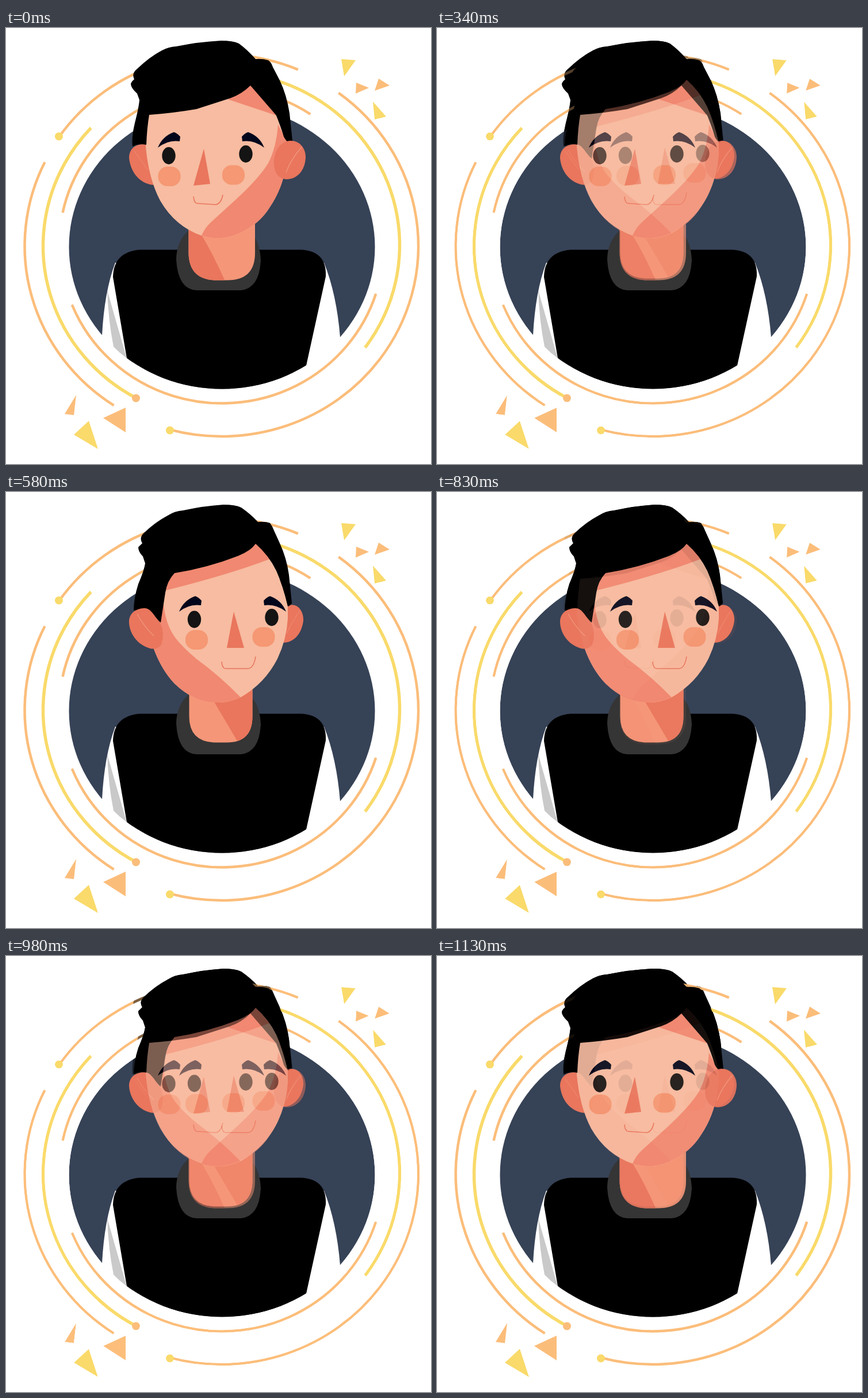
Animation, 739 px wide and 758 px high, one loop 1160 ms. Source, as an HTML page with a canvas:

```html
<!DOCTYPE html>
<html lang="en">
<head>
<meta charset="utf-8">
<title>Portrait</title>
<style>
html, body { margin: 0; width: 100%; height: 100%; overflow: hidden; background: #fff; }
canvas { display: block; width: 739px; height: 758px; }
</style>
</head>
<body>
<canvas id="stage" width="739" height="758"></canvas>
<script>
const W = 739, H = 758;
const HOLD = 250, STEP = 30, STEPS = 12, HALF = 580, LOOP = 1160;

const ORANGE = '#fbbd7a', YELLOW = '#f9da6a', NAVY = '#364256';
const SKIN = '#f7bca1', SHADE = '#f18871', DARK = '#e9765d', LIGHT = '#f59678';
const CHEEK = '#f59873', BROW = '#02061b', EYE = '#141414';

const left = {
  hair: 'M220 206 Q218 190 224 165 Q231 138 232 125 L228 114 Q217 104 217 97 Q219 92 223 89 Q218 79 228 71 Q250 50 271 39 Q282 33 296 32 Q335 24 374 22 Q395 22 405 27 Q420 38 434 54 Q446 53 456 56 Q461 59 464 68 L476 91 Q488 116 493 148 L498 196 Q490 203 483 189 Q477 168 470 152 L425 100 Q410 115 390 122 L331 141 Q290 148 249 151 Q245 175 244 203 Q232 200 220 206 Z',
  face: 'M249 148 Q242 180 243 206 Q248 262 268 300 Q294 345 340 361 Q375 371 405 357 Q441 341 459 311 Q480 280 487 240 L488 200 L470 152 L425 99 Q400 118 330 138 Z',
  shades: [
    'M425 99 L470 152 L386 124 Z',
    'M473 168 L490 200 L487 240 Q480 280 459 311 Q441 341 405 357 Q375 371 340 361 Q346 347 356 338 L401 297 Q440 261 456 235 Q470 208 473 168 Z'
  ],
  neck: 'M317.5 320 H433 V391 Q433 438.5 385 438.5 H362 Q317.5 436 317.5 390 Z',
  neckShade: 'M310 320 L340 360 Q360 393 381 440 H310 Z',
  backEar: 'M247 203 C225 199 214 210 214 226 C217 254 236 274 262 273 Z',
  backLine: 'M223 214 L246 246',
  frontEar: 'M493 196 C510 195 521 208 521 225 C520 249 505 263 488 263 C472 262 465 249 466 230 C468 212 477 198 493 196 Z',
  frontLine: 'M514 207 Q495 229 487 251',
  brows: [264, 449],
  eyes: [[283, 222], [417, 219]],
  cheeks: [[284, 258], [395.5, 255.5]],
  nose: 'M344 210 L326 274 L355 271 Z',
  mouth: 'M326 293 Q327 305 333 305 L364 307 Q374 306 377 290'
};

const right = {
  hair: 'M222 206 Q222 185 230 160 Q240 137 242 124 L238 112 Q230 104 230 96 Q234 92 237 89 Q231 79 240 71 Q260 52 281 41 Q293 33 308 32 Q345 24 378 22 Q399 22 409 27 Q425 38 438 52 Q451 51 459 54 Q463 59 466 67 L476 89 Q488 115 492 144 L497 193 Q495 197 490 199 Q482 164 470 137 Q457 110 434 90 Q426 102 404 111 Q350 132 293 141 Q280 155 277 175 L269 227 L246 205 Z',
  face: 'M293 139 Q276 158 272 205 L256 270 Q270 309 293 333 Q329 368 370 366 Q388 366 408 357 Q450 333 472 290 Q488 256 490 220 L490 198 Q482 164 470 137 Q457 110 434 89 Q412 112 350 128 Z',
  shades: [
    'M293 139 Q350 130 404 111 Q426 102 434 89 Q449 103 460 116 Q390 143 278 171 Q282 150 293 139 Z',
    'M274 194 Q277 229 294 253 Q307 270 331 290 Q372 320 408 357 Q388 366 370 366 Q329 368 293 333 Q270 309 256 270 Z'
  ],
  neck: 'M318.5 320 H428.5 V390 Q428.5 435.5 384 435.5 H361 Q318.5 433 318.5 390 Z',
  neckShade: 'M335 320 L362 365 L404 436 H440 V320 Z',
  backEar: 'M486 200 C502 189 518 203 517 224 C514 247 500 262 482 262 Z',
  backLine: 'M511 206 Q498 225 488 246',
  frontEar: 'M240 202 C250 201 255 211 263 221 C274 233 275 251 270 265 C265 274 254 274 245 270 C227 263 213 244 214 223 C216 209 226 203 240 202 Z',
  frontLine: 'M228 212 Q240 234 257 250',
  brows: [301, 487],
  eyes: [[327.5, 221.5], [462, 218]],
  cheeks: [[331.5, 257], [448, 252]],
  nose: 'M396 208 L384 271 L414 271 Z',
  mouth: 'M375 295 Q376 307 382 307 H421 Q431 306 434 286'
};

// three corners each: x1 y1 x2 y2 x3 y3
const confetti = [
  [YELLOW, 583, 54, 608, 56, 588, 84],
  [ORANGE, 609, 95, 631, 104, 608, 114],
  [ORANGE, 648, 88, 667, 100, 641, 109],
  [YELLOW, 638, 128, 661, 154, 641, 159],
  [ORANGE, 122, 638, 102, 671, 118, 673],
  [ORANGE, 208, 660, 169, 678, 208, 703],
  [YELLOW, 144, 683, 118, 707, 160, 732]
];

function layer() {
  const c = document.createElement('canvas');
  c.width = W;
  c.height = H;
  return c;
}

function fill(g, d, color) {
  g.fillStyle = color;
  g.fill(new Path2D(d));
}

function line(g, d, color, width) {
  g.strokeStyle = color;
  g.lineWidth = width;
  g.stroke(new Path2D(d));
}

function oval(g, x, y, rx, ry, color) {
  g.fillStyle = color;
  g.beginPath();
  g.ellipse(x, y, rx, ry, 0, 0, Math.PI * 2);
  g.fill();
}

// clockwise arc between two points lying near the ring
function ring(g, rx, ry, color, width, cx, cy, x1, y1, x2, y2) {
  const angle = (x, y) => Math.atan2((y - cy) / ry, (x - cx) / rx);
  g.strokeStyle = color;
  g.lineWidth = width;
  g.beginPath();
  g.ellipse(cx, cy, rx, ry, 0, angle(x1, y1), angle(x2, y2));
  g.stroke();
}

function drawRings(g) {
  const outer = (...p) => ring(g, 342, 331, ORANGE, 4.5, ...p);
  const middle = (...p) => ring(g, 310, 301, YELLOW, 5.5, ...p);
  const inner = (...p) => ring(g, 281, 273.5, ORANGE, 4.5, ...p);
  outer(374, 377, 92, 188, 508, 72);
  outer(375, 379, 579, 112, 285, 699);
  outer(374.5, 379, 187, 657, 67, 233);
  middle(374.5, 379, 226, 644, 148, 174);
  middle(374.5, 377.5, 440, 84, 625, 556);
  inner(373.5, 377.5, 99, 321, 530, 149);
  inner(375.5, 379, 643, 462, 115, 481);
  oval(g, 92, 188.5, 7, 7, YELLOW);
  oval(g, 285, 699.5, 7, 7, YELLOW);
  oval(g, 226, 643.5, 7, 7, ORANGE);
  for (const [color, ...p] of confetti) {
    fill(g, `M${p[0]} ${p[1]} L${p[2]} ${p[3]} L${p[4]} ${p[5]} Z`, color);
  }
}

function drawBody(g) {
  const disc = [375.5, 380.5, 266, 247];
  oval(g, ...disc, NAVY);
  fill(g, 'M190 408 Q171 458 167 534 L160 545 V640 H240 V410 Z', '#fff');
  fill(g, 'M553 408 Q575 463 581 538 L590 545 V640 H500 V410 Z', '#fff');
  g.save();
  g.beginPath();
  g.ellipse(...disc, 0, 0, Math.PI * 2);
  g.clip();
  fill(g, 'M176 456 L211 578 L187 554 Q178 510 176 456 Z', '#c9c9c9');
  fill(g, 'M233 385.5 H512 Q558 387 556 432 L522 587 V640 H222 L210 574 L186 433 Q187 389 233 385.5 Z', '#000');
  g.restore();
  fill(g, 'M320 350 Q296 370 296 403 Q299 454 331 456 H408 Q440 453 443 405 Q442 374 428 358 Z', '#353535');
}

function drawBrow(g, tip, dir) {
  g.save();
  g.translate(tip, 208);
  g.scale(dir, 1);
  fill(g, 'M0 0 Q8 -20 28 -27 Q34 -25 39 -19 L38 -11 Q18 -14 0 0 Z', BROW);
  g.restore();
}

function drawHead(g, p) {
  fill(g, p.neck, LIGHT);
  g.save();
  g.clip(new Path2D(p.neck));
  fill(g, p.neckShade, DARK);
  g.restore();
  fill(g, p.backEar, DARK);
  line(g, p.backLine, SHADE, 1.2);
  fill(g, p.face, SKIN);
  p.shades.forEach(d => fill(g, d, SHADE));
  fill(g, p.hair, '#000');
  fill(g, p.frontEar, DARK);
  line(g, p.frontLine, '#f29a80', 1.2);
  p.cheeks.forEach(([x, y]) => {
    g.fillStyle = CHEEK;
    g.beginPath();
    g.roundRect(x - 19.5, y - 17, 39, 34, 16);
    g.fill();
  });
  p.eyes.forEach(([x, y]) => oval(g, x, y, 11.7, 15, EYE));
  p.brows.forEach((x, i) => drawBrow(g, x, i ? -1 : 1));
  fill(g, p.nose, DARK);
  line(g, p.mouth, DARK, 1.6);
}

for (const pose of [left, right]) {
  pose.image = layer();
  const g = pose.image.getContext('2d');
  drawBody(g);
  drawRings(g);
  drawHead(g, pose);
}

const mix = layer();
const mg = mix.getContext('2d');
const ctx = document.getElementById('stage').getContext('2d');

function blend(from, to, k) {
  mg.globalCompositeOperation = 'source-over';
  mg.clearRect(0, 0, W, H);
  mg.globalAlpha = 1 - k;
  mg.drawImage(from.image, 0, 0);
  mg.globalCompositeOperation = 'lighter';
  mg.globalAlpha = k;
  mg.drawImage(to.image, 0, 0);
  mg.globalAlpha = 1;
  // over bare paper the new outline only shows in the second half
  if (k <= 0.5) {
    mg.globalCompositeOperation = 'destination-in';
    mg.drawImage(from.image, 0, 0);
  }
}

function render(time) {
  const t = time % LOOP;
  const [from, to] = t < HALF ? [left, right] : [right, left];
  const past = t % HALF - HOLD;
  const k = past < 0 ? 0 : (Math.floor(past / STEP) + 1) / STEPS;
  ctx.fillStyle = '#fff';
  ctx.fillRect(0, 0, W, H);
  if (k === 0) {
    ctx.drawImage(from.image, 0, 0);
    return;
  }
  // the old outline stays solid until the fade is over
  fill(ctx, from.hair, '#000');
  if (k > 0.5) fill(ctx, to.hair, '#000');
  blend(from, to, k);
  ctx.drawImage(mix, 0, 0);
}

const start = performance.now();
function tick() {
  render(performance.now() - start);
  requestAnimationFrame(tick);
}
tick();
</script>
</body>
</html>
```
